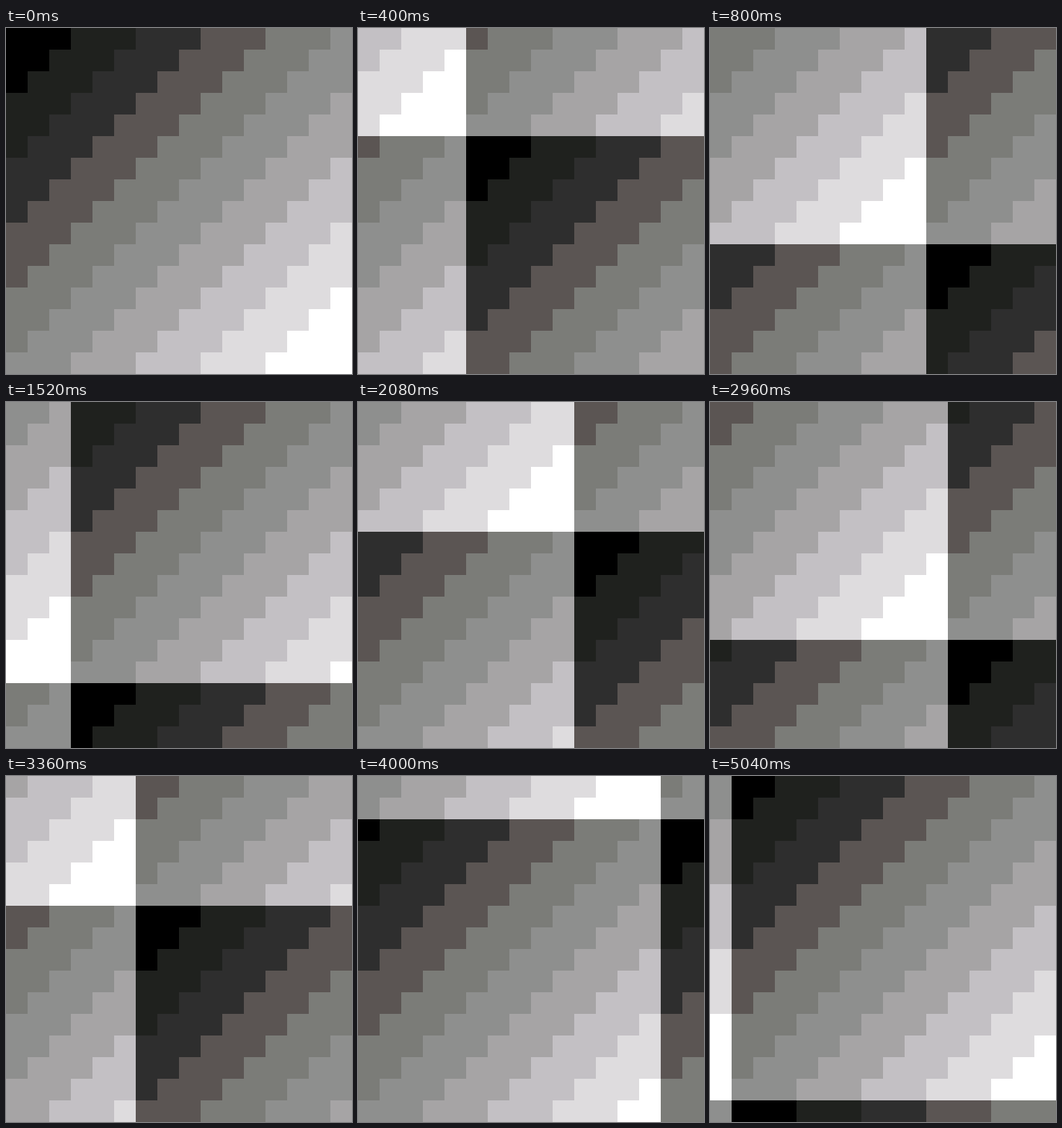
These frames come from a looping animation (480 by 480 pixels, 5.12 s). An HTML page with a canvas:

```html
<!DOCTYPE html>
<html>
<head>
<meta charset="utf-8">
<style>
  html, body { margin: 0; width: 100%; height: 100%; overflow: hidden; background: #000; }
  canvas { display: block; }
</style>
</head>
<body>
<canvas id="stage" width="480" height="480"></canvas>
<script>
const ctx = document.getElementById('stage').getContext('2d');
const SHADES = ['#000000', '#1f211e', '#2e2e2e', '#5b5553', '#7b7c78',
                '#8e8f8e', '#a6a4a5', '#c3c0c4', '#dedcde', '#ffffff'];
const GRID = 16, CELL = 30, STEP_MS = 80;
// Scroll direction of each 16-step leg
const LEGS = [[1, 1], [1, -1], [-1, -1], [-1, 1]];
const wrap = n => n & (GRID - 1);

function draw(step) {
  const [dx, dy] = LEGS[Math.floor(step / GRID)];
  for (let y = 0; y < GRID; y++) {
    for (let x = 0; x < GRID; x++) {
      const diagonal = wrap(x - dx * step) + wrap(y - dy * step);
      ctx.fillStyle = SHADES[Math.min(9, Math.floor(diagonal / 3))];
      ctx.fillRect(x * CELL, y * CELL, CELL, CELL);
    }
  }
}

const start = performance.now();
function tick() {
  const elapsed = performance.now() - start;
  draw(Math.floor(elapsed / STEP_MS) % (GRID * LEGS.length));
  requestAnimationFrame(tick);
}
tick();
</script>
</body>
</html>
```
